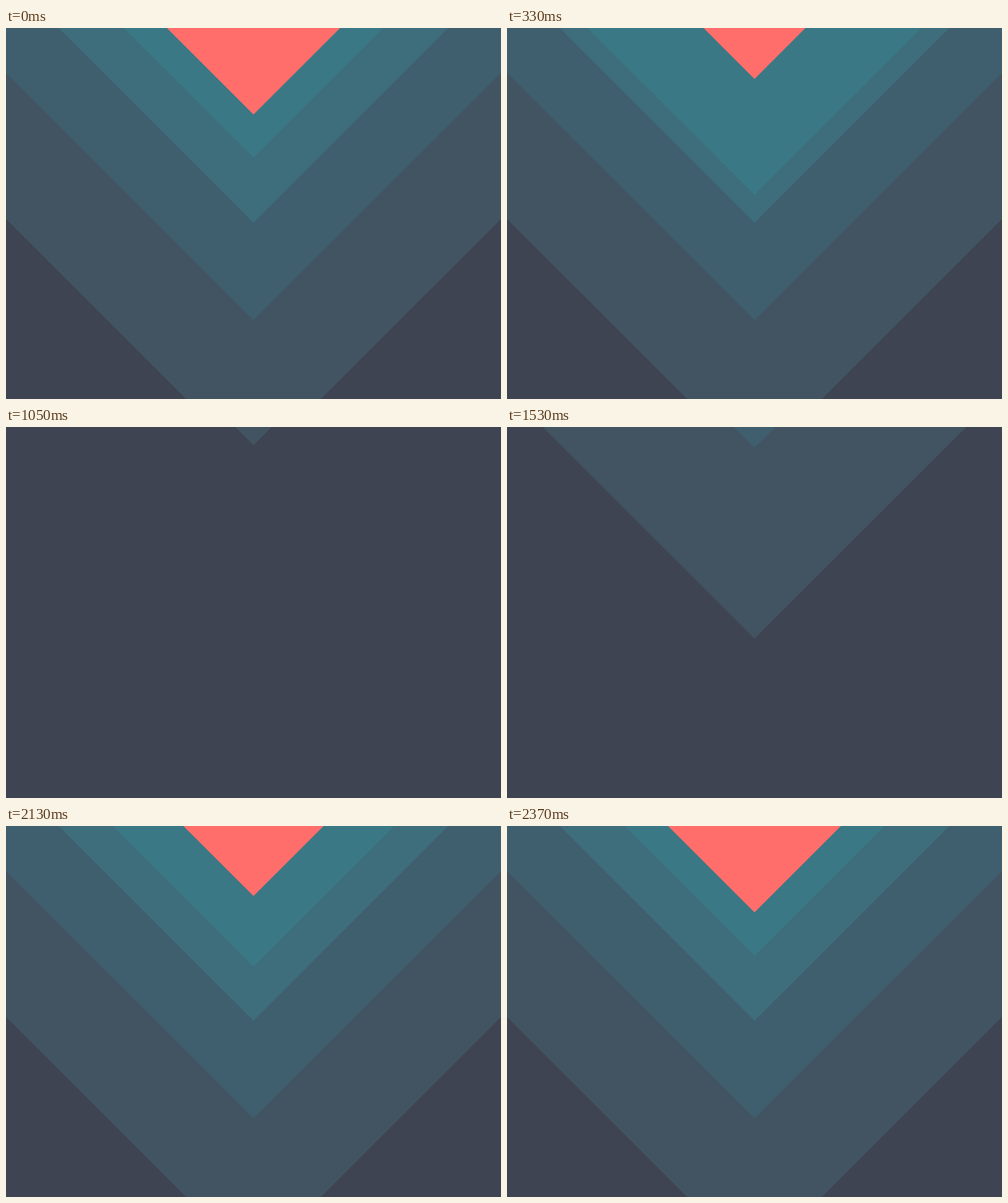
An HTML page with a canvas for the animation above (2.4 s loop, 800 by 600 pixels).

```html
<!DOCTYPE html>
<html lang="en">
<head>
<meta charset="utf-8">
<title>Chevrons</title>
<style>
  html, body { margin: 0; width: 100%; height: 100%; overflow: hidden; background: #3f4452; }
  canvas { display: block; }
</style>
</head>
<body>
<canvas id="stage" width="800" height="600"></canvas>
<script>
const ctx = document.getElementById('stage').getContext('2d');
const LOOP = 2400, HALF = LOOP / 2, STEP = 30;
const GROW = 600, STAGGER = 150, CORE_GROW = 414;
const CORE = 140, RATIO = 1.5;
const BACK = '#3f4452', CORE_COLOR = '#ff6e6b';
const colors = ['#425462', '#3f5e6e', '#3e6d7b', '#3a7885'];
const REACH = .62; // progress at which a layer first meets its full size

// Slow start, sudden rise to full size, then a bump of equal height for every layer.
function layerTip(size, x) {
  if (x <= 0) return 0;
  if (x >= 1) return size;
  if (x < REACH) {
    const r = x / REACH;
    return size * (.63 * r ** 3 + .37 * r ** 18);
  }
  const p = (x - REACH) / (1 - REACH);
  return size + 930 * p * (1 - p) ** 5;
}

function coreTip(u) {
  const k = Math.min(u / CORE_GROW, 1);
  return CORE * (1 - .02 * k - .98 * k ** 4);
}

function chevron(tip, color) {
  ctx.fillStyle = color;
  ctx.beginPath();
  ctx.moveTo(400 - tip, 0);
  ctx.lineTo(400 + tip, 0);
  ctx.lineTo(400, tip);
  ctx.fill();
}

function draw(t) {
  // The second half of the loop mirrors the first.
  const u = Math.min(t, LOOP - t);
  ctx.fillStyle = BACK;
  ctx.fillRect(0, 0, 800, 600);
  colors.forEach((color, i) => {
    const size = CORE * RATIO ** (colors.length - i);
    chevron(layerTip(size, (HALF - i * STAGGER - u) / GROW), color);
  });
  chevron(coreTip(u), CORE_COLOR);
}

const start = performance.now();
function tick() {
  const t = (performance.now() - start) % LOOP;
  draw(Math.floor(t / STEP) * STEP);
  requestAnimationFrame(tick);
}
tick();
</script>
</body>
</html>
```
